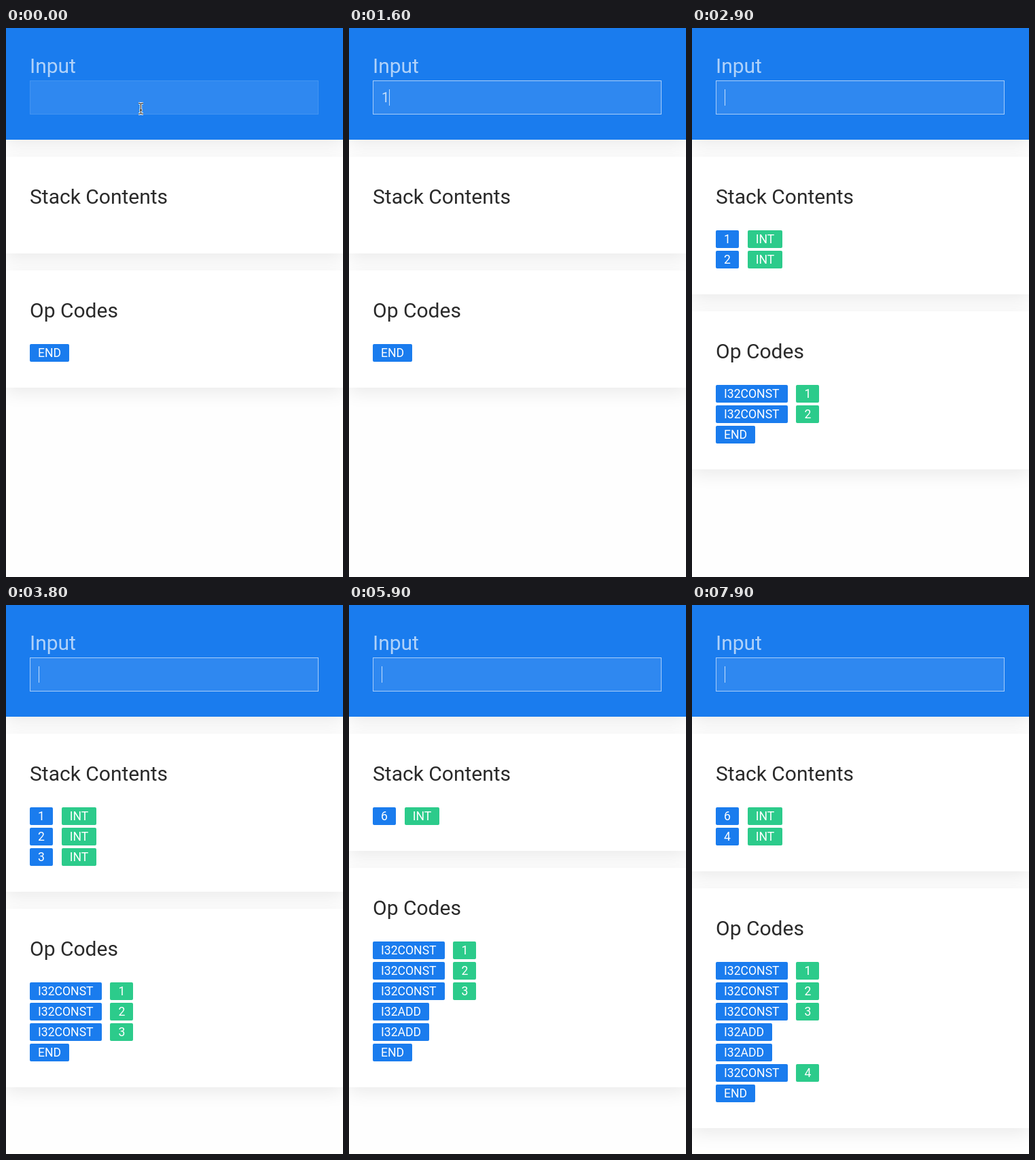
Animation of 496x806 px, one loop 8000 ms. Source, as an HTML page:

```html
<!DOCTYPE html>
<html lang="en">
<head>
<meta charset="utf-8">
<title>Stack machine</title>
<style>
  html, body { margin: 0; width: 100%; height: 100%; overflow: hidden; background: #fefefe; }
  body { position: relative; font-family: Roboto, sans-serif; color: #2a2a2a; }
  .card { position: absolute; left: 0; width: 100%; background: #fff; box-shadow: 0 8px 24px rgba(0, 0, 0, .08); }
  h2 { position: absolute; left: 35px; top: 41px; margin: 0; font: 400 30px/35px Roboto, sans-serif; white-space: nowrap; }
  header.card { top: 0; height: 164px; background: #1a7cee; }
  header h2 { top: 38px; color: rgba(255, 255, 255, .66); }
  #field { position: absolute; left: 35px; top: 77px; width: 425px; height: 50px; box-sizing: border-box;
    background: rgba(255, 255, 255, .09); background-clip: padding-box; border: 1px solid; }
  #typed { position: absolute; left: 12px; top: 12px; font-size: 20px; line-height: 24px; color: rgba(255, 255, 255, .72); }
  #caret { position: absolute; left: 100%; top: 0; width: 1px; height: 24px; background: rgba(255, 255, 255, .72); }
  #pointer { position: absolute; left: 193px; top: 109px; fill: none; }
  .rows { position: absolute; left: 35px; top: 108px; }
  .row { display: flex; gap: 12.8px; height: 30px; }
  .chip { height: 26px; padding: 0 12px; border-radius: 2px; background: #1a7cee; color: #fff;
    font-size: 17.6px; line-height: 26px; white-space: nowrap; }
  .chip + .chip { background: #2ccb8b; }
</style>
</head>
<body>
<header class="card">
  <h2>Input</h2>
  <div id="field"><div id="typed"><span id="text"></span><i id="caret"></i></div></div>
  <svg id="pointer" width="12" height="19">
    <path id="beam" d="M2 1.5H4Q5.5 1.5 5.5 3V15.5Q5.5 17 4 17H2M9 1.5H7Q5.5 1.5 5.5 3M5.5 15.5Q5.5 17 7 17H9M3.5 11.5H7.5" stroke="#fff" stroke-width="3"/>
    <use href="#beam" id="ink"/>
    <path d="M2 1.5H4Q5.5 1.5 5.5 3V15.5Q5.5 17 4 17H2M9 1.5H7Q5.5 1.5 5.5 3M5.5 15.5Q5.5 17 7 17H9M3.5 11.5H7.5" stroke="#111"/>
  </svg>
</header>
<section class="card" id="stack" style="top:189px"><h2>Stack Contents</h2><div class="rows"></div></section>
<section class="card" id="ops"><h2>Op Codes</h2><div class="rows"></div></section>

<script>
const LOOP = 8000, FOCUS = 600, BLINK = 500;
const entries = [
  { key: '1', typed: 1400, enter: 1900 },
  { key: '2', typed: 2500, enter: 2900 },
  { key: '3', typed: 3600, enter: 3800 },
  { key: '+', typed: 4500, enter: 4800 },
  { key: '+', typed: 5700, enter: 5900 },
  { key: '4', typed: 7500, enter: 7900 },
];
const byId = id => document.getElementById(id);
const stackCard = byId('stack'), opsCard = byId('ops');

function run(keys) {
  const stack = [], ops = [];
  for (const key of keys) {
    if (key === '+') {
      stack.push(stack.pop() + stack.pop());
      ops.push(['I32ADD']);
    } else {
      stack.push(Number(key));
      ops.push(['I32CONST', key]);
    }
  }
  return { stack: stack.map(value => [value, 'INT']), ops: [...ops, ['END']] };
}

// Fills a card and returns its height.
function fillCard(card, rows) {
  const chip = label => `<span class="chip">${label}</span>`;
  card.querySelector('.rows').innerHTML =
    rows.map(row => `<div class="row">${row.map(chip).join('')}</div>`).join('');
  const height = 142 + 30 * rows.length;
  card.style.height = height + 'px';
  return height;
}

let shownCount = -1;
function draw(t) {
  const done = entries.filter(e => t >= e.enter);
  if (done.length !== shownCount) {
    shownCount = done.length;
    const { stack, ops } = run(done.map(e => e.key));
    opsCard.style.top = 189 + fillCard(stackCard, stack) + 25 + 'px';
    fillCard(opsCard, ops);
  }

  const pending = entries.find(e => t >= e.typed && t < e.enter);
  byId('text').textContent = pending ? pending.key : '';

  const lastKey = Math.max(FOCUS, ...entries.flatMap(e => [e.typed, e.enter]).filter(time => time <= t));
  const caretOn = t >= FOCUS && Math.floor((t - lastKey) / BLINK) % 2 === 0;
  byId('caret').style.visibility = caretOn ? 'visible' : 'hidden';

  const focus = Math.min(1, Math.max(0, (t - FOCUS + 50) / 200));
  byId('field').style.borderColor = `rgba(255, 255, 255, ${0.18 + 0.44 * focus})`;
  byId('pointer').style.visibility = t < FOCUS ? 'visible' : 'hidden';
}

const start = performance.now();
function tick() {
  draw((performance.now() - start) % LOOP);
  requestAnimationFrame(tick);
}
tick();
</script>
</body>
</html>
```
